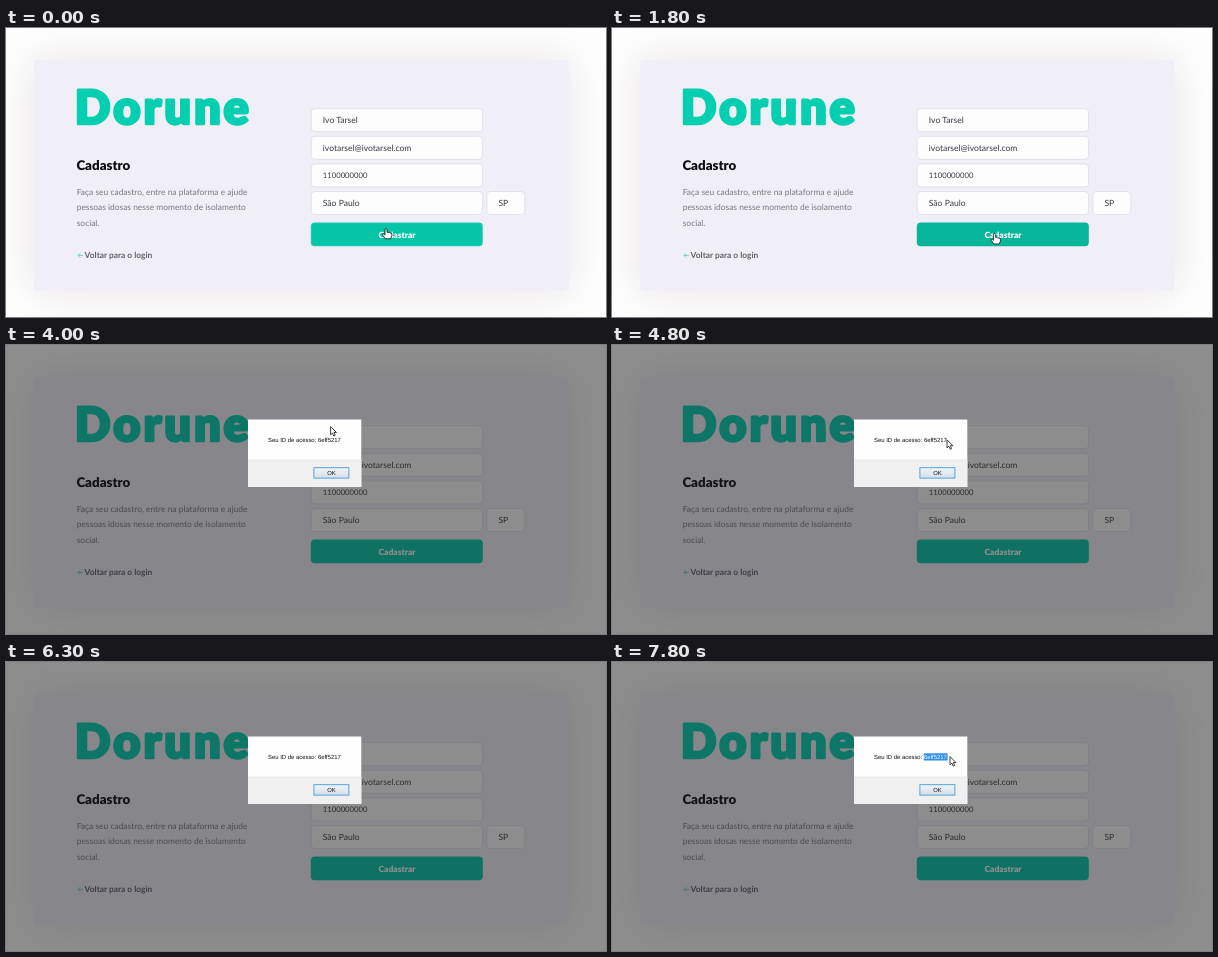
An HTML page that plays this animation: 600 px wide and 289 px high, repeating every 8000 ms.

```html
<!DOCTYPE html>
<html lang="pt-BR">
<head>
<meta charset="utf-8">
<title>Cadastro</title>
<style>
  html, body { margin: 0; width: 100%; height: 100%; overflow: hidden; background: #fefdfe; }
  svg { display: block; width: 100%; height: 100%; }
  text { font-family: Lato, "Open Sans", sans-serif; font-size: 8.56px; text-rendering: geometricPrecision; }
  .brand { font-size: 47px; font-weight: 900; letter-spacing: 2.9px; fill: #04cfb0; stroke: #04cfb0; stroke-width: 2.5; stroke-linejoin: round; }
  .title { font-size: 13.3px; font-weight: 900; fill: #0d0d12; }
  .intro { font-size: 8.45px; fill: #7a7983; }
  .intro text { font-size: inherit; }
  .back { font-size: 8.4px; font-weight: 700; fill: #62606c; }
  .arrow { fill: none; stroke: #4fd3bf; stroke-width: .8; }
  .field { fill: #fdfdfe; stroke: #dedce6; stroke-width: .8; }
  .value { fill: #3a3a44; }
  .phone { font-size: 7.7px; }
  .label { font-size: 8.5px; font-weight: 900; fill: #fff; text-anchor: middle; }
  .dialog text { font-family: "Liberation Sans", Arial, sans-serif; font-size: 5.92px; fill: #111; }
  .dialog .picked { fill: #fff; }
  .pointer { fill: #fff; stroke: #111; stroke-width: .8; stroke-linejoin: round; }
</style>
</head>
<body>
<svg viewBox="0 0 600 289" preserveAspectRatio="none">
  <defs>
    <filter id="soft" filterUnits="userSpaceOnUse" x="-80" y="-80" width="760" height="450">
      <feGaussianBlur stdDeviation="22"/>
    </filter>
    <linearGradient id="key" x2="0" y2="1">
      <stop offset="0" stop-color="#eef4fa"/>
      <stop offset="1" stop-color="#d5dfe8"/>
    </linearGradient>
  </defs>

  <rect width="600" height="289" fill="#fefdfe"/>
  <rect x="28" y="32" width="534.5" height="230.5" fill="#140008" opacity=".1" filter="url(#soft)"/>
  <rect x="28" y="32" width="534.5" height="230.5" rx="3" fill="#f0eef6"/>

  <text class="brand" x="68.8" y="95.6">Dorune</text>
  <text class="title" x="70.4" y="141.8">Cadastro</text>
  <g class="intro">
    <text x="70.7" y="167">Faça seu cadastro, entre na plataforma e ajude</text>
    <text x="70.7" y="182.3">pessoas idosas nesse momento de isolamento</text>
    <text x="70.7" y="197.6">social.</text>
  </g>
  <path class="arrow" d="M77 227.4H72M74.2 225.2L72 227.4L74.2 229.6"/>
  <text class="back" x="78.6" y="230.3">Voltar para o login</text>

  <g id="form"></g>
  <rect id="button" x="304.8" y="194.5" width="172" height="23.8" rx="4"/>
  <rect id="focus" x="305.2" y="194.9" width="171.2" height="23" rx="3.6" fill="none"
    stroke="#fff" stroke-width=".8" stroke-dasharray="1 1" opacity=".35"/>
  <text class="label" x="391" y="209.6">Cadastrar</text>

  <g id="modal" class="dialog">
    <rect width="600" height="289" fill="#1a1a1a" opacity=".49"/>
    <rect x="242" y="74.5" width="113.3" height="67.5" fill="#fefefe"/>
    <rect x="242" y="115" width="113.3" height="27" fill="#f0f0f0"/>
    <rect x="242" y="114.7" width="113.3" height=".6" fill="#dfdfdf"/>
    <rect x="307.9" y="122.7" width="35" height="10.4" fill="url(#key)" stroke="#4a9bdc" stroke-width=".9"/>
    <text x="325.4" y="130" text-anchor="middle">OK</text>
    <rect id="mark" x="311.8" y="91.3" width="23.8" height="7.2" fill="#2f8ee4"/>
    <text x="262" y="97">Seu ID de acesso: <tspan id="code">6eff5217</tspan></text>
  </g>

  <g id="pointer">
    <path id="hand" class="pointer" d="M-1 .8Q0-.6 1 .8V4Q1.9 3.3 2.7 4.2Q3.6 3.7 4.3 4.6Q5.8 4.3 5.8 5.8V7.6L4.6 10.4H-.6L-3.4 6.8Q-3.6 5.2-2.2 5.6L-1 6.7Z"/>
    <path id="tip" class="pointer" d="M0 0V8.2L1.9 6.5L3.2 9.4L4.6 8.8L3.4 5.9H5.9Z"/>
    <path id="beam" d="M0 0V4" stroke="#333" stroke-width=".6" opacity=".6"/>
  </g>
</svg>
<script>
  const LOOP = 8000, HOVER = 300, OPEN = 3000, SELECT = 6800;
  const SVG = "http://www.w3.org/2000/svg";
  const $ = id => document.getElementById(id);
  const modal = $("modal"), button = $("button"), focusRing = $("focus");
  const mark = $("mark"), code = $("code"), pointer = $("pointer");
  const shapes = ["hand", "tip", "beam"];

  // time, shape, x, y: each step holds until the next
  const steps = [
    [0, "hand", 380, 200.4],
    [800, "hand", 381.5, 202.6],
    [1000, "hand", 382.2, 204.6],
    [1300, "hand", 382.6, 205.6],
    [OPEN, "tip", 379.8, 205],
    [3800, "none", 0, 0],
    [4000, "tip", 324.6, 81.6],
    [4500, "none", 0, 0],
    [4800, "tip", 335, 94.8],
    [5500, "beam", 331.5, 93.5],
    [5800, "beam", 322.5, 93.5],
    [6000, "beam", 316, 92.8],
    [6300, "none", 0, 0],
    [7000, "tip", 336.4, 94.6],
    [7300, "tip", 338, 94.6]
  ];

  function add(parent, tag, attrs, content = "") {
    const el = document.createElementNS(SVG, tag);
    for (const key in attrs) el.setAttribute(key, attrs[key]);
    el.textContent = content;
    parent.appendChild(el);
  }

  function addField(x, row, width, value, extra = "") {
    const y = 80.7 + row * 27.6;
    add($("form"), "rect", { class: "field", x, y, width, height: 23, rx: 3.6 });
    add($("form"), "text", { class: "value " + extra, x: x + 11.6, y: y + 14.2 }, value);
  }

  const show = (el, on) => { el.style.display = on ? "" : "none"; };

  function draw(t) {
    const open = t >= OPEN, selected = t >= SELECT;
    const hover = t >= HOVER && !open;
    button.setAttribute("fill", hover ? "#07b59b" : "#04c5a8");
    show(focusRing, t < HOVER);
    show(modal, open);
    show(mark, selected);
    code.setAttribute("class", selected ? "picked" : "");

    const [, shape, x, y] = steps.filter(s => s[0] <= t).pop();
    for (const id of shapes) show($(id), id === shape);
    pointer.setAttribute("transform", `translate(${x} ${y})`);
  }

  addField(305.2, 0, 171.4, "Ivo Tarsel");
  addField(305.2, 1, 171.4, "ivotarsel@ivotarsel.com");
  addField(305.2, 2, 171.4, "1100000000", "phone");
  addField(305.2, 3, 171.4, "São Paulo");
  addField(480.8, 3, 38, "SP");

  const start = performance.now();
  function tick() {
    draw((performance.now() - start) % LOOP);
    requestAnimationFrame(tick);
  }
  tick();
</script>
</body>
</html>
```
